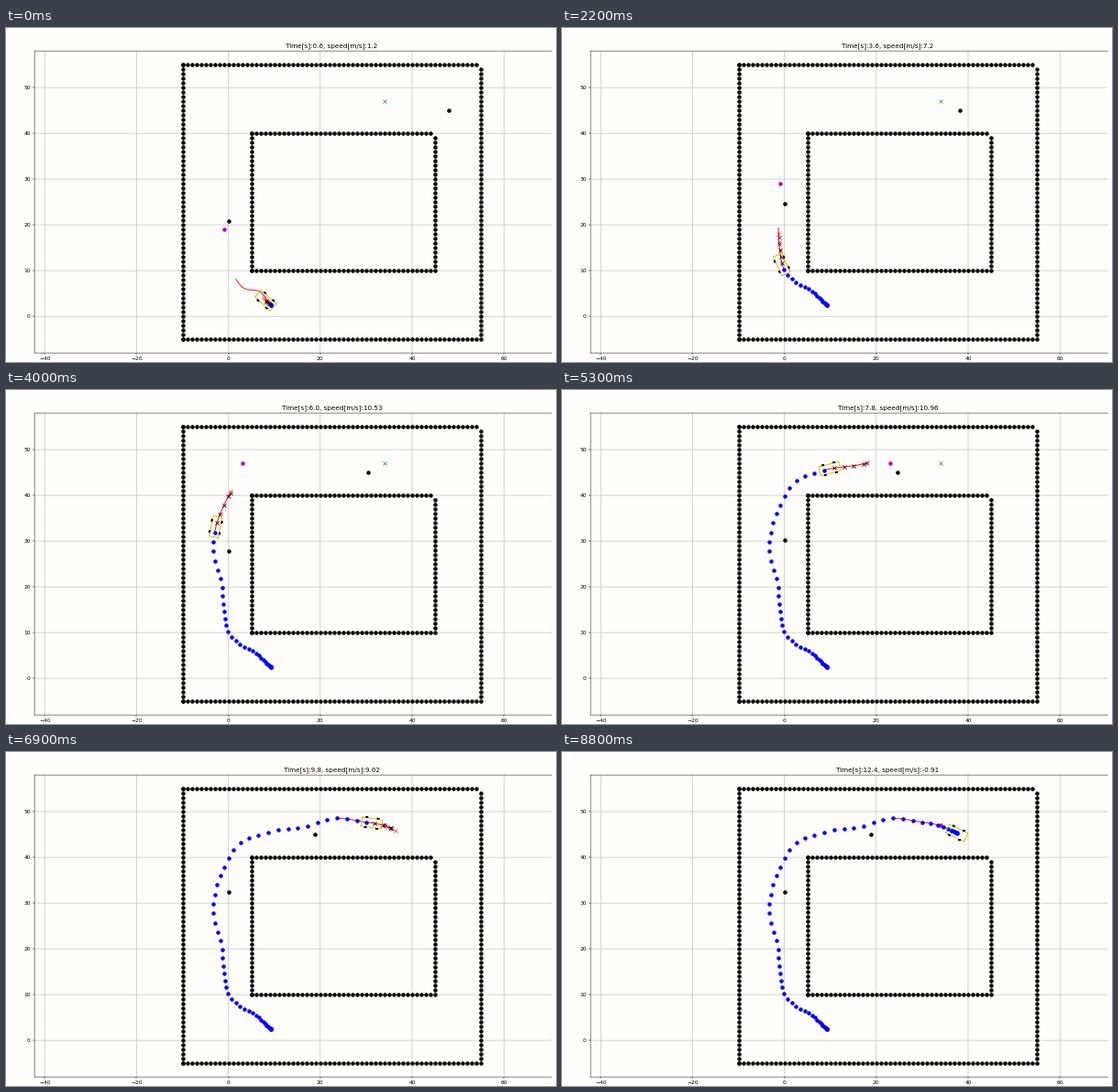
Write a matplotlib script that moves like this. It is 600 px wide and 365 px high and loops after 8900 ms.

```python
import numpy as np
import matplotlib.pyplot as plt
from matplotlib.animation import FuncAnimation

W, H = 600, 365
K = 0.436                       # display scale of the plot
SX, SY, X0, Y0 = 5.01, 5.0, 242.6, 315.1
LEFT, RIGHT, TOP, BOTTOM = 31.1, 595.5, 25.1, 355.1
STEPS, FROZEN, DT = 60, 43, 0.2
PAPER = "#fffefc"

plt.rcParams.update({
    "font.family": "DejaVu Sans",
    "font.size": 10 * K,
    "lines.linewidth": 1.5 * K,
    "lines.markersize": 6 * K,
    "lines.markeredgewidth": K,
    "axes.linewidth": 0.8 * K,
    "grid.linewidth": 0.9 * K,
})

# corner points of the drive
ROUTE = np.array([
    (9.24, 2.48), (8.4, 3.24), (6, 5.5), (2.5, 7.4), (0, 10.1), (-1, 14.6),
    (-1.4, 19.9), (-3.35, 28.7), (-1, 37.8), (2.3, 42.9), (8.3, 45.4),
    (16.9, 46.8), (23, 48.5), (29.3, 47.8), (34, 46.9), (37.6, 45.3)])


def smooth(p, fine=60):
    """Dense Hermite curve through p and its arc length."""
    t = np.r_[0, np.cumsum(np.hypot(*np.diff(p, axis=0).T))]
    d = np.gradient(p, t, axis=0)
    u = np.linspace(0, 1, fine, endpoint=False)[:, None]
    parts = []
    for i, h in enumerate(np.diff(t)):
        parts.append((2 * u**3 - 3 * u**2 + 1) * p[i]
                     + (u**3 - 2 * u**2 + u) * h * d[i]
                     + (3 * u**2 - 2 * u**3) * p[i + 1]
                     + (u**3 - u**2) * h * d[i + 1])
    curve = np.vstack(parts + [p[-1:]])
    return curve, np.r_[0, np.cumsum(np.hypot(*np.diff(curve, axis=0).T))]


CURVE, ARC = smooth(ROUTE)


def at(s):
    return np.column_stack([np.interp(s, ARC, c) for c in CURVE.T])


def speed(n):
    """Speed up, cruise, brake, then back up a little."""
    up = 1.2 + 0.4 * n
    cruise = min(10.53 + 0.43 / 9 * (n - 27), 10.96)
    brake = 9.02 - 1.15 * (n - 46)
    back = -0.91 - 0.36 * (59 - n)
    return max(min(up, cruise, brake), back)


# distance driven, from three steps before the first picture
DRIVEN = np.r_[0, np.cumsum([DT * speed(n) for n in range(-3, STEPS + 6)])]


def driven(n):
    return DRIVEN[np.asarray(n) + 3]


def heading(s):
    a, b = at([s - 0.1, s + 0.6])
    return np.arctan2(b[1] - a[1], b[0] - a[0])


def aims():
    """Waypoint aimed at in each step: the next one once within reach."""
    way = [(-1, y) for y in (19, 29, 39)] + [(x, 47) for x in (3, 13, 23, 34)]
    out, i = [], 0
    for p in at(driven(np.arange(STEPS))):
        while i < len(way) - 1 and np.hypot(*(p - way[i])) < 10:
            i += 1
        out.append(way[i])
    return out


def turn(p, a):
    c, s = np.cos(a), np.sin(a)
    return p @ np.array([[c, s], [-s, c]])


def rect(x0, x1, y):
    return np.array([(x0, -y), (x1, -y), (x1, y), (x0, y), (x0, -y)])


def row(xs, ys):
    return [(x, y) for x in xs for y in ys]


BODY = rect(-1, 3.5, 1)
WHEEL = rect(-0.3, 0.3, 0.2)
HUBS = row([0, 2.5], [-1.12, 1.12])
AIMS = aims()
WALLS = (row(range(-10, 55), [-5, 55]) + row([-10], range(-5, 56))
         + row([55], range(-5, 55)) + row(range(5, 45), [10, 40])
         + row([5], range(10, 41)) + row([45], range(10, 40)))

fig = plt.figure(figsize=(W / 100, H / 100), dpi=100, facecolor=PAPER)
ax = fig.add_axes([LEFT / W, 1 - BOTTOM / H, (RIGHT - LEFT) / W,
                   (BOTTOM - TOP) / H], facecolor=PAPER)
ax.set_xlim((LEFT - X0) / SX, (RIGHT - X0) / SX)
ax.set_ylim((Y0 - BOTTOM) / SY, (Y0 - TOP) / SY)
ax.set_xticks(range(-40, 61, 20))
ax.set_yticks(range(0, 51, 10))
ax.tick_params(length=3.5 * K, width=0.8 * K, pad=3.5 * K)
ax.grid(True, snap=False)
for side in ax.spines.values():
    side.set_snap(False)
ax.spines["right"].set_visible(False)
title = fig.text(355.6 / W, 1 - 21 / H, "", size=12 * K, ha="center",
                 va="baseline")


def dots(color, z, places=((0, 0),)):
    group = ax.scatter([], [], s=(6.2 * K) ** 2, color=color, linewidths=K,
                       zorder=z, snap=False)
    group.set_offsets(places)
    return group


def line(style, z, **kw):
    return ax.plot([], [], style, zorder=z, **kw)[0]


dots("k", 3, WALLS)
ax.plot(34, 47, "xg", zorder=3)
movers = dots("k", 3)
target = dots("m", 4)
plan = line("-r", 5)
trail = dots("b", 6)
ahead = line("xr", 7)
ref = line("xk", 8)
body = line("-", 9, color="y")
wheels = [ax.fill(*WHEEL.T, "k", lw=K, zorder=10)[0] for _ in HUBS]


def draw(i):
    n = (2 * i + 2) // 3
    v, s = speed(n), driven(n)
    yaw, here = heading(s), at([s])[0]
    title.set_text(f"Time[s]:{round(0.6 + DT * n, 1)}, "
                   f"speed[m/s]:{round(v, 2)}")

    m = min(n, 45)
    movers.set_offsets([(48 - 0.65 * m, 45), (0, 20.8 + 0.26 * m)])
    target.set_offsets([AIMS[n]])
    trail.set_offsets(at(driven(np.arange(-3, n + 1))))

    # the plan looks a fixed way ahead and is kept once the goal is near
    start = driven(min(n, FROZEN))
    reach = 9.3 if n < FROZEN else 12
    u = np.linspace(0, 1, 60)
    path = at(start + reach * u)
    path[:, 1] += 0.7 * np.exp(-n / 4) * np.sin(2 * np.pi * u)
    plan.set_data(*path.T)

    k = np.arange(1, 6)
    ref.set_data(*at(np.minimum(s + DT * abs(v) * k, start + reach)).T)
    ahead.set_data(*at(np.minimum(driven(n + k), s + 9.6)).T)
    for marks in (ref, ahead):
        marks.set_visible(v > 0)

    body.set_data(*(turn(BODY, yaw) + here).T)
    steer = np.angle(np.exp(1j * (heading(s + 2.5) - yaw)))
    for wheel, hub in zip(wheels, HUBS):
        shape = turn(WHEEL, steer if hub[0] else 0) + hub
        wheel.set_xy(turn(shape, yaw) + here)
    return []


anim = FuncAnimation(fig, draw, frames=89, interval=100, repeat=True,
                     repeat_delay=0, init_func=lambda: draw(0))
plt.show()
```
